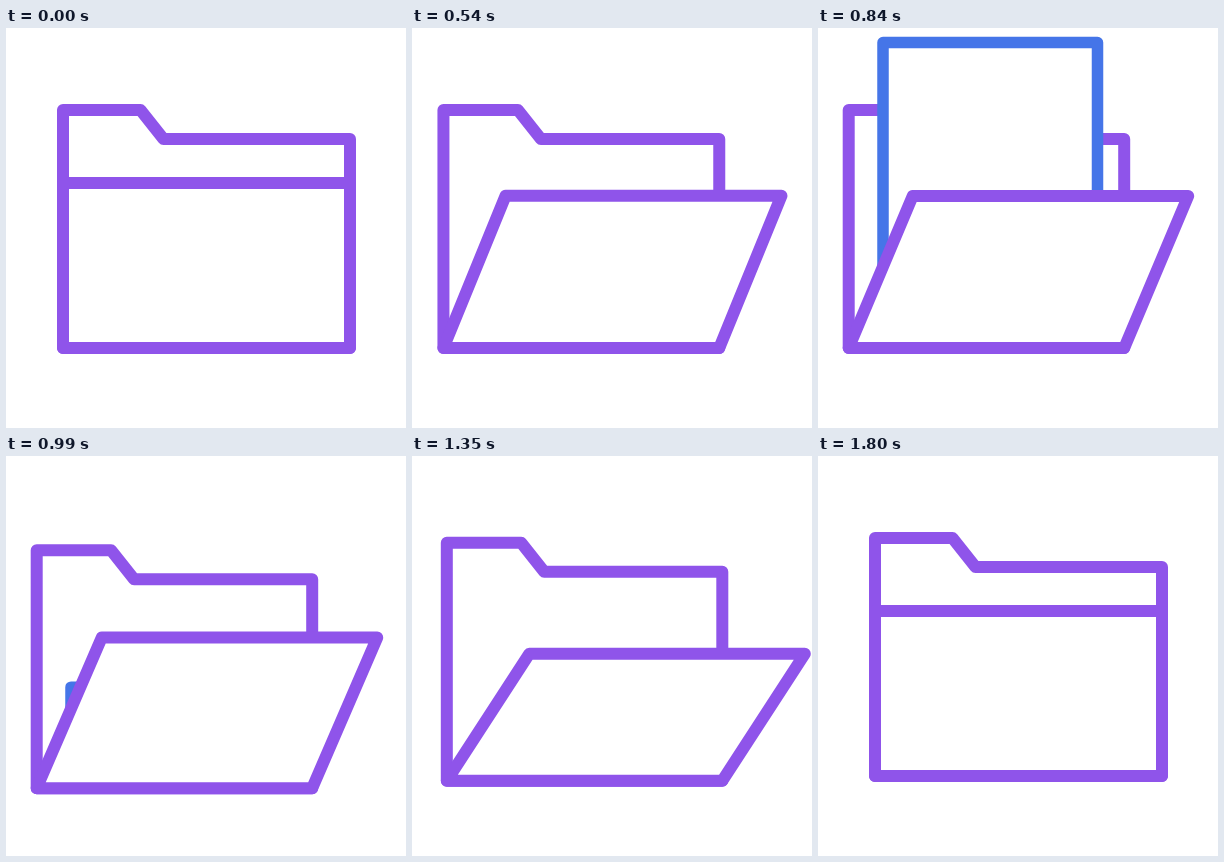
Write an HTML page that moves like this. It is 400x400 px and loops after 1830 ms.

```html
<!DOCTYPE html>
<html lang="en">
<head>
<meta charset="utf-8">
<title>Folder</title>
<style>
  html, body { margin: 0; width: 100%; height: 100%; overflow: hidden; background: #fff; }
  svg { display: block; width: 100%; height: 100%; }
  path { fill: #fff; stroke: #8f54ea; stroke-width: 12; stroke-linejoin: round; }
  #sheet { stroke: #4575e8; stroke-width: 11.5; }
</style>
</head>
<body>
<svg viewBox="0 0 400 400">
  <path id="back"/>
  <path id="sheet"/>
  <path id="front"/>
</svg>
<script>
const LOOP = 1830, STEP = 30, SHEET_HEIGHT = 285;

const progress = (t, from, to) => Math.min(1, Math.max(0, (t - from) / (to - from)));

function ease(t, from, to) {
  const p = progress(t, from, to);
  return p * p * (3 - 2 * p);
}

function draw(id, points) {
  const d = "M" + points.map(p => p.map(n => n.toFixed(2)).join(" ")).join("L") + "Z";
  document.getElementById(id).setAttribute("d", d);
}

function render(t) {
  const open = ease(t, 0, 600);
  const bend = ease(t, 930, 1350);                        // flap sinks under the impact
  const shut = 1 - (1 - progress(t, 1350, 1800)) ** 1.5;  // flap swings back, slowing down

  // Back panel: slides aside while open, dips on impact and rebounds.
  const left = 57 - 26.3 * (open - ease(t, 1200, 1800));
  const width = 287 - 11.5 * (open - ease(t, 1350, 1800));
  const drop = 24.3 * ease(t, 870, 1110) - 29.3 * ease(t, 1110, 1500) + 5 * ease(t, 1500, 1800);
  const right = left + width, base = 320 + drop;
  const top = base - 238, shelf = base - 209, fold = left + width * 0.27;
  draw("back", [[left, top], [fold, top], [fold + 23, shelf],
    [right, shelf], [right, base], [left, base]]);

  // Sheet: falls in from above and never reaches below the base.
  const edge = -301 + 580 * ease(t, 570, 1080);
  const foot = Math.min(edge + SHEET_HEIGHT, base);
  draw("sheet", [[65, edge], [279.5, edge], [279.5, foot], [65, foot]]);
  document.getElementById("sheet").style.display = t > 570 && t < 1110 ? "" : "none";

  // Front flap
  const lean = (64 * open + 18.5 * bend) * (1 - shut);
  const lip = base - 165 + 13 * open + 25 * bend - 38 * ease(t, 1350, 1620);
  draw("front", [[left + lean, lip], [right + lean, lip], [right, base], [left, base]]);
}

const start = performance.now();
function tick() {
  const t = (performance.now() - start) % LOOP;
  render(Math.floor(t / STEP) * STEP);
  requestAnimationFrame(tick);
}
tick();
</script>
</body>
</html>
```
